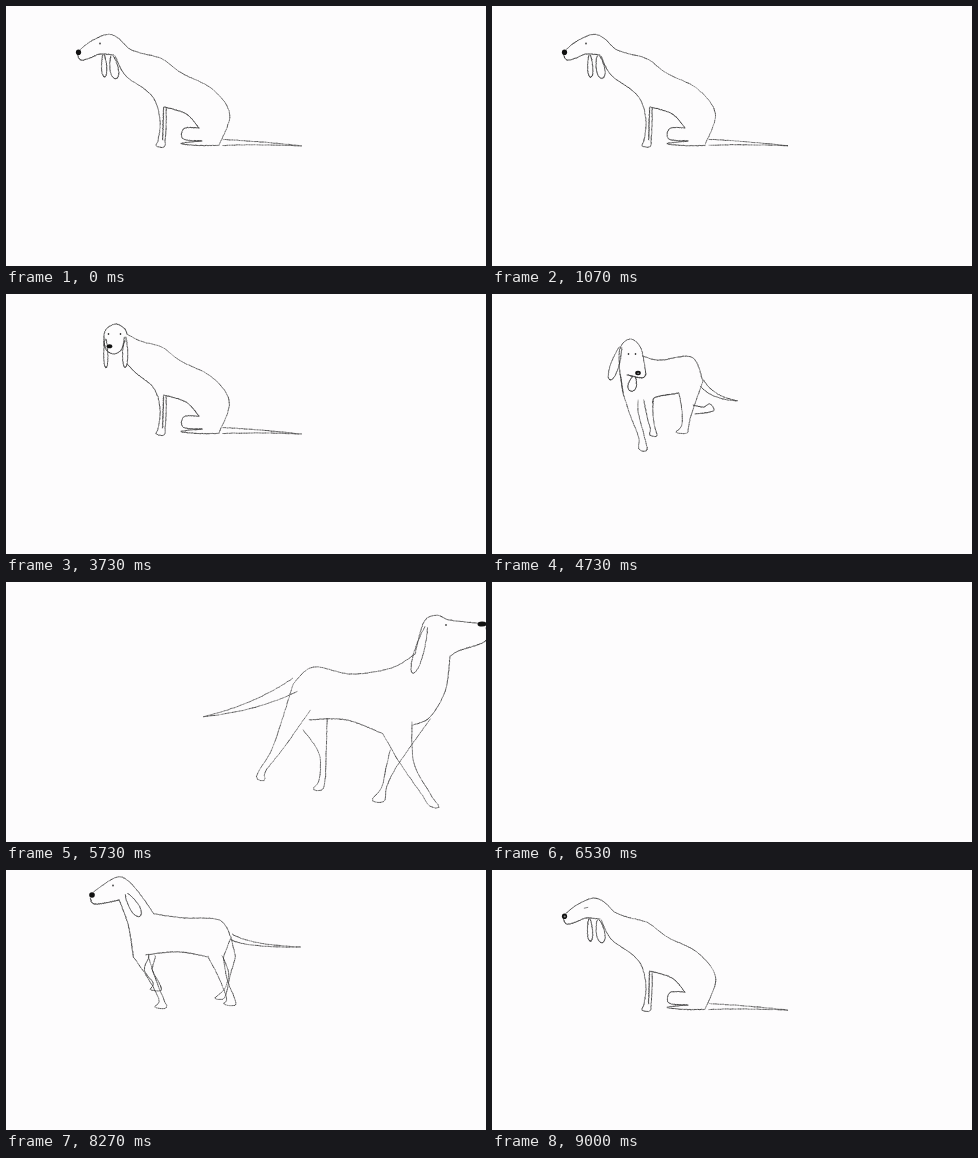
These frames come from a looping animation (480 by 260 pixels, 9.14 s). An HTML page with a canvas:

```html
<!DOCTYPE html>
<html lang="en">
<head>
<meta charset="utf-8">
<title>Restless dog</title>
<style>
html, body { margin: 0; width: 100%; height: 100%; overflow: hidden; background: #fdfcfd; }
canvas { display: block; width: 480px; height: 260px; }
</style>
</head>
<body>
<canvas id="stage" width="480" height="260"></canvas>
<script>
const ctx = document.getElementById('stage').getContext('2d');
const LOOP = 9140, TICK = 1000 / 15, SAMPLES = 60, TAU = 2 * Math.PI;
const clamp = v => Math.max(0, Math.min(1, v));
const mix = (a, b, k) => a + (b - a) * k;
const sample = f => Array.from({ length: SAMPLES }, (_, i) => f(i / (SAMPLES - 1)));

function spline(a, b, c, d, t) {
  return b + .5 * t * (c - a + t * (2 * a - 5 * b + 4 * c - d + t * (3 * (b - c) + d - a)));
}

// Smooth line through key points, sampled evenly along its length.
function through(pts) {
  const dense = [], len = [0], at = i => pts[Math.max(0, Math.min(pts.length - 1, i))];
  for (let i = 0; i < pts.length - 1; i++)
    for (let k = 0; k < 16; k++)
      dense.push([0, 1].map(c => spline(at(i - 1)[c], at(i)[c], at(i + 1)[c], at(i + 2)[c], k / 16)));
  dense.push(at(pts.length));
  for (let i = 1; i < dense.length; i++)
    len.push(len[i - 1] + Math.hypot(dense[i][0] - dense[i - 1][0], dense[i][1] - dense[i - 1][1]));
  let i = 1;
  return sample(t => {
    const goal = t * len[len.length - 1];
    while (i < dense.length - 1 && len[i] < goal) i++;
    const k = clamp((goal - len[i - 1]) / (len[i] - len[i - 1] || 1));
    return [0, 1].map(c => mix(dense[i - 1][c], dense[i][c], k));
  });
}
const curve = s => through(s.split(' ').map(p => p.split(',').map(Number)));

// Drop shape hanging from (x,y) to (tx,ty), open at the top.
function ear(x, y, tx, ty, w) {
  const len = Math.hypot(tx - x, ty - y), px = (y - ty) / len, py = (tx - x) / len;
  return sample(t => {
    const u = mix(.4, TAU - .4, t), along = (1 - Math.cos(u)) / 2;
    const side = Math.sin(u) * (1 - .3 * Math.cos(u)) * w / 2;
    return [mix(x, tx, along) + px * side, mix(y, ty, along) + py * side];
  });
}

// Bent taper, drawn out along one side and back along the other.
function tail([x, y], [bx, by], [tx, ty], w) {
  const len = Math.hypot(tx - x, ty - y), px = (ty - y) / len, py = (x - tx) / len;
  return sample(t => {
    const u = 1 - Math.abs(2 * t - 1), side = Math.sign(.5 - t) * w / 2 * (1 - u);
    return [mix(mix(x, bx, u), mix(bx, tx, u), u) + px * side,
            mix(mix(y, by, u), mix(by, ty, u), u) + py * side];
  });
}

// Leg outline: left top, knee and ankle as [x, y, half width], foot as [left, right, y], right top.
function leg(left, knee, ankle, foot, right) {
  const side = ([x, y, w], s) => [x + s * w, y];
  return through([left, side(knee, -1), side(ankle, -1), [foot[0], foot[2] - 1], [foot[1], foot[2]],
    side(ankle, 1), side(knee, 1), right]);
}

const sit = {
  head: curve('74,43.5 85,35 101,28.3 112,32 123,42.5 136,47.5'),
  jaw: curve('71.5,49 75,54 84,52 94,48 108,49'),
  chest: curve('109,50 119,69 139,83.5 148,93 152,103'),
  back: curve('136,47.5 156,53 175,67 206,83 223.5,108 213,139'),
  fn: leg([152, 103], [157, 118, 3], [155.5, 134, 3.5], [150, 158, 141], [160, 102]),
  ff: curve('157.5,101 156.5,134'),
  belly: curve('158,101 180,108 193,122'),
  hn: curve('193,122 178,122.5 177,133 196,135'),
  hf: curve('196,135 175,137.5 192,139.5 213,139.5'),
  tail: tail([217, 136.5], [250, 136.5], [297, 140], 6),
  earA: ear(97.5, 48, 98.5, 71, 5), earB: ear(106, 49, 110, 72.5, 8),
  nose: [72.5, 46.3], eyes: [[94, 37.5]], muzzle: [2.6, 2.8]
};

const POSES = {
  sit,
  turn: { ...sit,
    head: curve('86.5,47 93,38 97,32.5 105,29.8 115,36 136,47.5'),
    jaw: curve('85,52 89,56 95,56.5 109,50'),
    chest: curve('118,64 128,77 146,91 152,103'),
    earA: ear(98.5, 53, 99, 71.5, 4.5), earB: ear(113, 41, 114, 67, 7),
    nose: [87.2, 50], eyes: [[103.5, 39.5]], muzzle: [3.1, 2]
  },
  front: { ...sit,
    head: curve('98,52 99,37 109,30 118,34 121,40'),
    jaw: curve('98,50 101,57 108,60 115,56 119,46'),
    chest: curve('121,70 131,80 146,92 152,103'),
    back: curve('121,40 136,47.5 156,53 175,67 206,83 223.5,108 213,139'),
    earA: ear(99.5, 44, 100, 73.5, 4), earB: ear(119, 42, 119, 73.5, 5),
    nose: [103.5, 52.3], eyes: [[102.5, 40], [114.5, 40]], muzzle: [2.8, 2]
  },
  stand: {
    head: curve('128,80 128,55 138,45 149,54 154,80'),
    jaw: curve('154,80 150,84 135,81'),
    chest: curve('128,80 131,99'),
    back: curve('151,62 168,66 200,63 211,87'),
    fn: leg([131, 99], [142, 119, 4.5], [149.5, 143, 3], [147, 155, 156], [146, 106]),
    ff: leg([152, 106], [158.5, 124, 3], [161, 135, 2.5], [158, 165, 142], [161, 107]),
    belly: curve('161,108 164,103 187,99'),
    hn: leg([187, 99], [195, 118, 5], [193, 132, 3.5], [184, 195, 139], [211, 87]),
    hf: curve('201,111 211,113 218,110 221,117 203,120'),
    tail: tail([210, 89], [220, 104], [246, 107], 7),
    earA: ear(129, 52, 118, 86, 8), tongue: ear(142, 82, 139, 97, 8),
    nose: [146, 79], eyes: [[136.5, 60], [143.5, 60]], muzzle: [2.8, 2.2]
  },
  right: {
    head: curve('474,41.5 443,38 431,33.3 418,40 409,72'),
    jaw: curve('480,45 479,59 453,68.5 444,74'),
    chest: curve('444,74 439.5,108 424,135 407,143'),
    back: curve('409,72 385,86 345,92 307,85 287,102'),
    fn: leg([377, 152], [401, 181, 7], [420, 212, 4.5], [424, 433, 225], [406, 140]),
    ff: leg([384, 168], [386, 183, 5.5], [378, 205, 2.5], [366, 378, 219], [424, 137]),
    belly: curve('303,138 340,138 377,152'),
    hn: leg([287, 102], [273, 164, 6], [256, 189, 3.5], [251, 259, 198], [304, 128]),
    hf: leg([297, 148], [316.5, 172, 3.5], [316, 198, 3], [307, 316, 208], [321, 137]),
    tail: tail([289, 103], [250, 126], [196, 135], 14),
    earB: ear(421, 43, 407, 91, 9),
    nose: [476, 42], eyes: [[440, 43]], muzzle: [4.5, 2.6]
  },
  left: {
    head: curve('315,33 334,20 345,18.5 358,30 376,55'),
    jaw: curve('312,39 317,45 341,41'),
    chest: curve('341,41 350,66 355,96'),
    back: curve('376,55 405,59 441,61 453,78'),
    fn: leg([355, 96], [362.5, 120, 3.5], [361, 141, 2.5], [351, 362, 149], [371, 95]),
    ff: leg([371, 97], [378, 112, 4], [393, 126, 3], [391, 402, 134], [377, 96]),
    belly: curve('368,96 400,93 430,98'),
    hn: leg([430, 97], [434, 118, 4], [431, 139, 4], [421, 432, 146], [453, 78]),
    hf: leg([444, 97], [461, 116, 1], [466, 133, 1.5], [460, 469, 143], [453, 78]),
    tail: tail([454, 78], [470, 87], [524, 88], 6),
    earB: ear(348, 34, 362, 57, 9),
    nose: [314, 36], eyes: [[335, 26.5]], muzzle: [2.8, 2.8]
  }
};

const GAITS = {
  right: { at: 86, dir: 1, hip: 150, foot: 225, reach: 27, back: ['ff', 'hn'] },
  left: { at: 113, dir: -1, hip: 98, foot: 147, reach: 15, back: ['ff', 'hf'] }
};
const LEGS = ['fn', 'ff', 'hn', 'hf'], STRIDE = 8;

const KEYS = [
  [0, 'sit'], [27, 'sit'], [33, 'turn'], [38, 'front'], [57, 'front'],
  [65, 'stand', { dx: -34 }], [71, 'stand'],
  [78, 'right', { scale: .65, dy: 24 }], [86, 'right'], [98, 'right', { dx: 290 }],
  [104, 'left', { dx: 162 }], [113, 'left'], [116, 'left', { dx: -66 }], [124, 'left', { dx: -228, dy: -11 }],
  [131, 'sit', { lift: 17 }], [133, 'sit'], [137, 'sit']
].map(([tick, name, move]) => ({ tick, name, pose: POSES[name], scale: 1, dx: 0, dy: 0, lift: 0, ...move }));

// Swings a leg from its hip, raises the head, then moves the point onto the stage.
function place([x, y], part, key, tick) {
  const gait = GAITS[key.name];
  if (gait && LEGS.includes(part)) {
    const ph = gait.back.includes(part) ? Math.PI : 0, turn = (tick - gait.at) / STRIDE * TAU + ph;
    const w = clamp((y - gait.hip) / (gait.foot - gait.hip));
    x += w * gait.dir * gait.reach * (Math.cos(turn) - Math.cos(ph));
    y -= w * gait.reach / 3 * Math.max(0, -Math.sin(turn));
  }
  y -= key.lift * clamp((150 - x) / 45) * clamp((98 - y) / 40);
  return [x * key.scale + key.dx, y * key.scale + key.dy];
}

function noise(n) {
  const v = Math.sin(n * 12.9898 + 4.137) * 43758.5453;
  return v - Math.floor(v);
}

function ink(pts, seed) {
  const wobble = (n, size) => (noise(n) - .5) * size;
  const rough = pts.map(([x, y], i) => [
    x + wobble(seed, .4) + wobble(seed + i * 1.7, .4),
    y + wobble(seed + .5, .4) + wobble(seed + i * 2.3 + 9, .4)
  ]);
  for (let i = 1; i < rough.length; i++) {
    ctx.globalAlpha = mix(.5, .9, noise(seed + i * 3.1));
    ctx.lineWidth = mix(.6, .9, noise(seed + i * 4.7));
    ctx.beginPath();
    ctx.moveTo(...rough[i - 1]);
    ctx.lineTo(...rough[i]);
    ctx.stroke();
  }
  ctx.globalAlpha = 1;
}

function oval(x, y, rx, ry, color) {
  ctx.fillStyle = color;
  ctx.beginPath();
  ctx.ellipse(x, y, rx, ry, 0, 0, TAU);
  ctx.fill();
}

const PARTS = ['tail', 'hf', 'ff', 'back', 'belly', 'hn', 'fn', 'chest', 'head', 'jaw', 'tongue', 'earA', 'earB'];

function draw(tick) {
  ctx.fillStyle = '#fdfcfd';
  ctx.fillRect(0, 0, 480, 260);
  if (tick >= 98 && tick < 104) return;

  const next = KEYS.findIndex(key => key.tick > tick), a = KEYS[next - 1], b = KEYS[next];
  let k = (tick - a.tick) / (b.tick - a.tick);
  if (a.name !== b.name) k = k * k * (3 - 2 * k);
  const near = k < .5 ? a : b;

  const between = (p, q, part) => {
    const u = place(p, part, a, tick), v = place(q, part, b, tick);
    return [mix(u[0], v[0], k), mix(u[1], v[1], k)];
  };

  ctx.strokeStyle = '#2c2c2c';
  ctx.lineCap = ctx.lineJoin = 'round';
  PARTS.forEach((part, n) => {
    const p = a.pose[part], q = b.pose[part], own = near.pose[part];
    if (!own) return;
    ink(own.map((pt, i) => p && q ? between(p[i], q[i], part) : place(pt, part, near, tick)), tick * 7.31 + n * 53);
  });

  const [nx, ny] = between(a.pose.nose, b.pose.nose, 'nose');
  const [rx, ry] = [0, 1].map(c => mix(a.pose.muzzle[c] * a.scale, b.pose.muzzle[c] * b.scale, k));
  const blink = tick >= 133;
  oval(nx, ny, rx, ry, '#111');
  if (blink || near.name === 'stand') oval(nx + .2, ny + .2, rx * .4, ry * .35, '#888');
  near.pose.eyes.forEach((_, i) => {
    const [x, y] = between(a.pose.eyes[i] || a.pose.eyes[0], b.pose.eyes[i] || b.pose.eyes[0], 'eyes');
    if (blink) ink([[x - 1.8, y + .6], [x + 1.6, y - .2]], tick);
    else oval(x, y, .8, .9, '#333');
  });
}

// Twelve drawings a second: every fifth tick repeats the one before it.
function drawingAt(ms) {
  const n = Math.min(135, Math.floor((ms + 3.5) / TICK));
  return n % 5 === 2 ? n - 1 : n;
}

const start = performance.now();
let shown = -1;
function loop() {
  const tick = drawingAt((performance.now() - start) % LOOP);
  if (tick !== shown) draw(shown = tick);
  requestAnimationFrame(loop);
}
loop();
</script>
</body>
</html>
```
